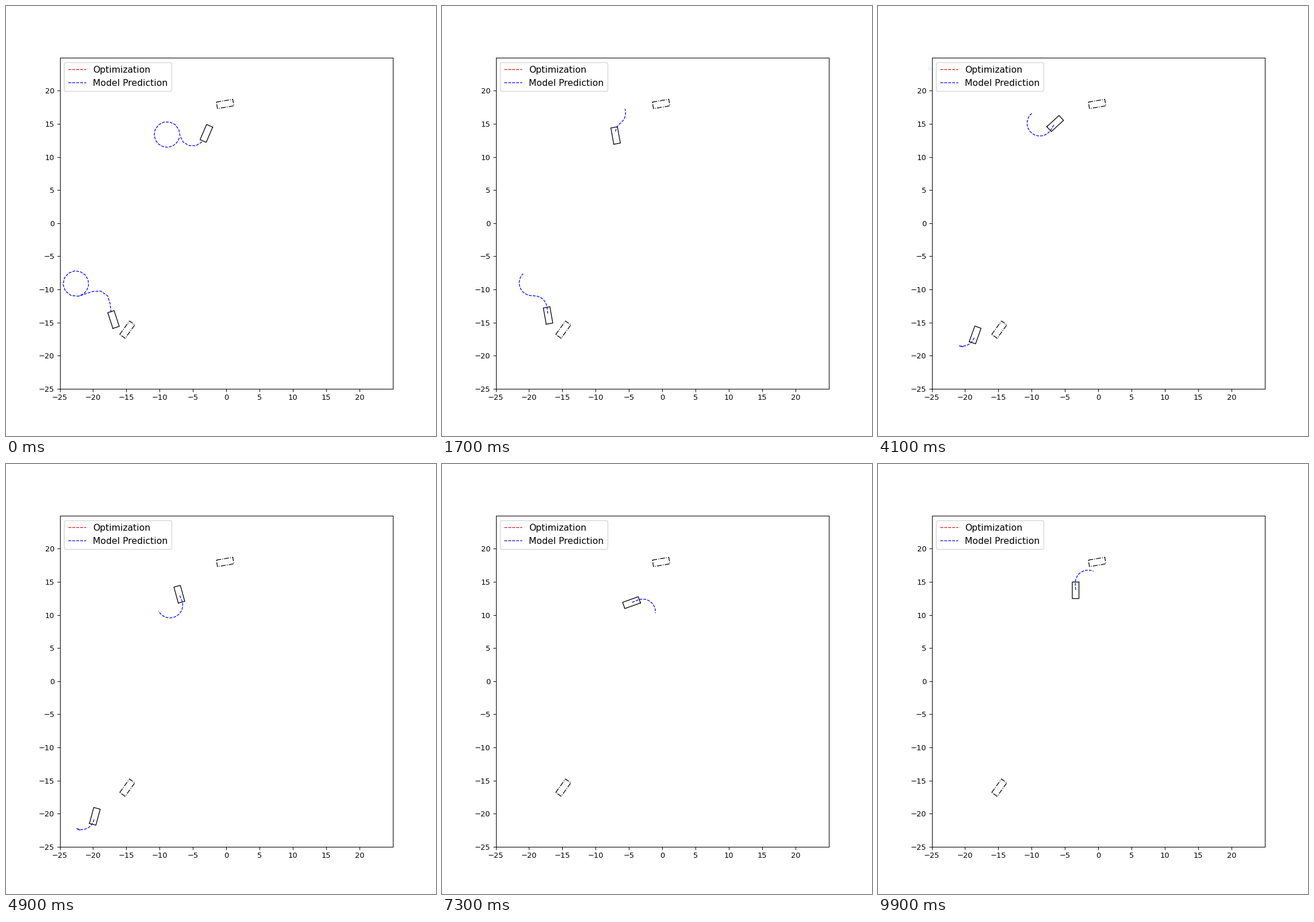
Recreate the animation shown at these times as a matplotlib script. Size 748 px wide and 748 px high, loop 10 s.

```python
import numpy as np
import matplotlib.pyplot as plt
from matplotlib.animation import FuncAnimation

FRAMES, INTERVAL, SUB = 100, 100, 50
PX, PY = 11.594, 11.519      # pixels per data unit
OX, OY = 383.35, -377.74     # pixel position of the data origin, y up
RADIUS = 22.25               # full-lock turning radius, pixels
CAR = (2.5, 1.0)
SCALE = 0.935                # shrinks all default line and text sizes

plt.rcParams.update({
    "font.size": 10 * SCALE, "lines.linewidth": SCALE,
    "axes.linewidth": 0.8 * SCALE,
    **{f"{axis}tick.major.{key}": size * SCALE for axis in "xy"
       for key, size in [("size", 3.5), ("width", 0.8), ("pad", 3.5)]},
})


def to_data(x, y):
    return (x - OX) / PX, (y - OY) / PY


def unit(deg):
    a = np.radians(deg)
    return np.array([np.cos(a), np.sin(a)])


def drive(start, heading, speed, straight, lock, leave=None, slip=(0, 0)):
    """Integrate a car that runs straight, then holds full lock.

    speed and leave are (times, values); leave steers by heading later on.
    Returns position, heading and speed at every frame.
    """
    t = np.arange((FRAMES + 1) * SUB) / SUB
    v = np.interp(t, *speed)
    run = np.cumsum(v) / SUB
    angle = heading + lock * np.degrees(np.maximum(run - straight, 0) / RADIUS)
    if leave:
        angle = np.where(t < leave[0][0], angle, np.interp(t, *leave))
    step = v * unit(angle) / SUB
    pos = np.cumsum(step, axis=1) - step
    pos += np.reshape(start, (2, 1)) + np.outer(slip, t)
    return pos[:, ::SUB].T, angle[::SUB], v[::SUB]


UPPER = drive((348.6, -221.6), 247,
              ([0, 29.7, 39, 57, 61], [17, 0, -3.6, -1.9, -1.05]),
              straight=9.7, lock=-1, slip=(-0.03, 0.02))
LOWER = drive((187, -545.4), 108,
              ([0, 23.4, 29, 33, 57], [13.6, 0, 0, -4.6, -6.2]),
              straight=10.8, lock=1,
              leave=([17, 24, 47, 57], [460, 435, 429, 459]))

# Planned arcs per gear: length = base + gain * speed, then steering side.
# A fixed negative length backs up.
UPPER_PLAN = {1: [(-6.5, 3.6, -1), (-46, 11, 1)],
              -1: [(-8.5, 3.6, 1), (13, -2, 0), (30, 15, -1)]}
LOWER_PLAN = {1: [(-4.5, 1.33, -1), (15, -1.2, 0), (27, 1.4, 1),
                  (1, 1.8, 0), (23, 9.1, -1)],
              -1: [(-40, 14, -1), (-9, 0, 0)]}


def predict(n, car, plans, points=20, ds=0.2):
    """Chain the planned arcs, starting one step ahead of the car."""
    pos, angle, v = (part[n + 1] for part in car)
    gear = -1 if v < 0 else 1
    turn, way = [], []
    for base, gain, side in plans[gear]:
        span = base + gain * abs(v)
        if gain:
            span = max(span, 0)
        count = int(abs(span) / ds)
        turn += [side * np.degrees(ds / RADIUS)] * count
        way += [np.sign(span)] * count
    travel = angle + (180 if gear < 0 else 0)
    moves = unit(travel + np.cumsum(turn)) * way * ds
    track = np.hstack([pos[:, None], pos[:, None] + np.cumsum(moves, axis=1)])
    u = np.linspace(0, 1, points)
    at = (len(way) * (1.3 * u - 0.3 * u**2)).round().astype(int)
    return to_data(*track[:, at])


def box(pos, deg):
    """Closed outline of a car."""
    along, across = unit(deg) * CAR[0] / 2, unit(deg + 90) * CAR[1] / 2
    corners = [(-1, 1), (1, 1), (1, -1), (-1, -1), (-1, 1)]
    return np.array([to_data(*pos) + i * along + j * across
                     for i, j in corners]).T


fig, ax = plt.subplots(figsize=(7.48, 7.48), dpi=100)
ax.set(xlim=(-25, 25), ylim=(-25, 25),
       xticks=np.arange(-25, 25, 5), yticks=np.arange(-25, 25, 5))

ax.plot([], [], "r--", label="Optimization")
ax.plot([], [], "b--", label="Model Prediction")
ax.legend(loc="upper left", fontsize=12 * SCALE)

for goal, angle in [((381.2, -170.4), 9.8), ((211, -563), 54.3)]:
    ax.plot(*box(goal, angle), "k-.")

CARS = [(UPPER, UPPER_PLAN), (LOWER, LOWER_PLAN)]
bodies = [ax.plot([], [], "k-")[0] for _ in CARS]
paths = [ax.plot([], [], "b--")[0] for _ in CARS]


def update(n):
    for (car, plans), body, path in zip(CARS, bodies, paths):
        body.set_data(*box(car[0][n], car[1][n]))
        path.set_data(*predict(n, car, plans))
    return bodies + paths


anim = FuncAnimation(fig, update, frames=FRAMES, interval=INTERVAL,
                     init_func=lambda: update(0), repeat=True, repeat_delay=0)
plt.show()
```
